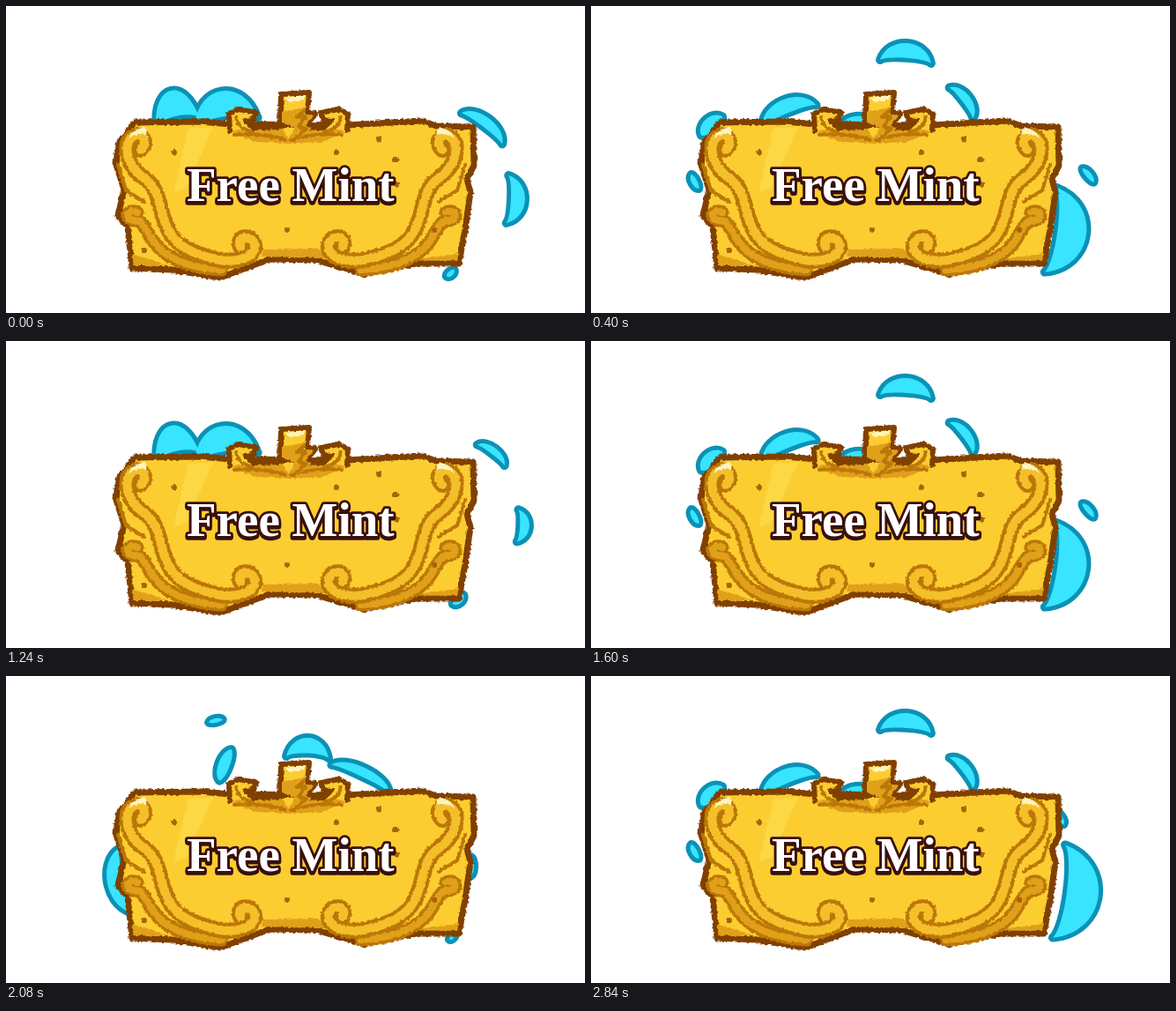
An HTML page for the animation above (2.88 s loop, 657 px wide and 348 px high).

```html
<!DOCTYPE html>
<html lang="en">
<head>
<meta charset="utf-8">
<title>Free Mint</title>
<style>
  html, body { margin: 0; width: 100%; height: 100%; overflow: hidden; background: #fff; }
  svg { display: block; width: 657px; height: 348px; }
  path, text { stroke-linejoin: round; stroke-linecap: round; }
  #rims { fill: none; stroke: #0b91b6; stroke-width: 10; }
  #rims path { vector-effect: non-scaling-stroke; }
  #fills { fill: #38e4ff; }
  .edge { fill: #fccd30; stroke: #804000; stroke-width: 7; }
  .thin { stroke-width: 6; }
  .shade { fill: #e0a01a; }
  .line { fill: none; stroke: #bb7707; stroke-width: 4; }
  .rim, .band { fill: none; stroke: #bb7707; stroke-width: 18; }
  .band { stroke: #f5bf2a; stroke-width: 10; }
  .low .rim { stroke-width: 15; }
  .low .band { stroke: #e0a01a; stroke-width: 8; }
  .glow { fill: #fdd845; }
  .shine { fill: #fff3bd; }
  .speck { stroke: #a6640a; stroke-width: 6; }
  text { font: bold 55px "Liberation Serif", serif; paint-order: stroke; stroke: #38100e; stroke-width: 5.5; }
</style>
</head>
<body>
<svg viewBox="0 0 657 348">
  <defs>
    <filter id="rough" x="0" y="0" width="657" height="348" filterUnits="userSpaceOnUse" color-interpolation-filters="sRGB">
      <feTurbulence type="fractalNoise" baseFrequency=".3" seed="4"/>
      <feDisplacementMap in="SourceGraphic" scale="4" xChannelSelector="R" yChannelSelector="G"/>
    </filter>
    <path id="hook" d="M149 234C139 229 133 240 144 243C160 241 158 264 180 280Q204 297 245 299"/>
    <path id="ribbon" d="M153 163C166 150 145 138 138 156C135 174 146 188 158 196C177 209 173 237 186 257C198 278 226 284 242 288C262 291 284 285 282 271C280 258 260 260 266 273"/>
    <g id="scroll">
      <path class="line" d="M127 180L136 209L157 222"/>
      <g class="low"><use href="#hook" class="rim"/><use href="#hook" class="band"/></g>
      <use href="#ribbon" class="rim"/><use href="#ribbon" class="band"/>
      <path class="shine" d="M139 150Q144 138 158 138L160 146Q149 143 139 150Z"/>
    </g>
    <g id="curl">
      <path class="shade" d="M252 141L312 136L324 156L282 154Z"/>
      <path class="line" d="M260 146Q290 143 318 152"/>
      <path class="edge thin" d="M254 141L253 122L264 117L284 121L281 129L272 130L281 138L311 137"/>
      <path class="line" d="M261 126Q263 139 280 143"/>
    </g>
  </defs>

  <g id="rims"></g>
  <g id="fills"></g>

  <g filter="url(#rough)">
    <path class="edge" d="M146 132L220 131L255 134L388 135L472 130L488 136L530 137L531 181L523 196L527 211L521 253
      L514 292L465 292L405 304L352 288L299 287L243 308L188 299L143 297L138 250L127 238L134 208L125 180L127 157Z"/>
    <path class="shade" d="M292 276L354 275L366 286L290 284ZM456 288L514 281L512 288ZM143 281L184 294L145 294Z"/>
    <path class="glow" d="M207 139L235 137L205 205L190 212Z"/>
    <use href="#scroll"/>
    <use href="#scroll" transform="matrix(-1 0 0 1 648 0)"/>
    <use href="#curl"/>
    <use href="#curl" transform="matrix(-1 0 0 1 641 0)"/>
    <path class="edge thin" d="M311 133L312 100L344 98L342 120L351 122L342 133"/>
    <path class="shade" d="M313 120L340 115L338 123L350 124L340 135L346 139L323 157L327 138L313 132Z"/>
    <path class="line" d="M338 119L330 126L340 125L332 137L341 139L325 153"/>
    <path class="shine" d="M316 104L340 101L338 106L321 109Z"/>
    <path class="speck" d="M191 166h1M156 277h1M319 254h0M375 166h0M441 174h2M423 151h0M486 254h0M443 202h0"/>
  </g>
  <text x="205" y="223" fill="#38100e" aria-hidden="true">Free Mint</text>
  <text x="205" y="221" fill="#fff">Free Mint</text>
</svg>

<script>
const LOOP = 2880, CYCLE = 1200, HOLD = 80;
const CENTRE = { x: 328, y: 215 };
const drops = [];

function addPath(layer, d) {
  const path = document.createElementNS("http://www.w3.org/2000/svg", "path");
  path.setAttribute("d", d);
  return document.getElementById(layer).appendChild(path);
}

// Long drops are crescents, short ones are beads.
function dropPath(half, height) {
  const top = -height / .75, base = -top * (half > 20 ? -.2 : .6), side = half * .75;
  return `M${-half} 0C${-side} ${top} ${side} ${top} ${half} 0C${side} ${base} ${-side} ${base} ${-half} 0Z`;
}

// A burst peaks at one moment; each drop bulges away from the sign.
function burst(peak, life, ...shapes) {
  for (const [x, y, half, height, tilt = 0] of shapes) {
    const dx = x - CENTRE.x, dy = y - CENTRE.y;
    const angle = Math.atan2(dx / 200 ** 2, -dy / 120 ** 2) * 180 / Math.PI + tilt;
    const d = dropPath(half, height);
    drops.push({ peak, life, x, y, angle, vx: dx * .0006, vy: -.12,
      paths: [addPath("rims", d), addPath("fills", d)] });
  }
}

// Left and top
burst(0, 200, [195, 132, 25, 37, 18], [250, 132, 36, 36, 10]);
burst(400, 200, [225, 125, 33, 20], [137, 136, 16, 10], [118, 199, 9, 4, -40],
  [357, 63, 29, 21], [420, 110, 22, 12, 35], [301, 130, 14, 5]);
burst(720, 160, [246, 82, 37, 18, 27], [153, 95, 14, 8], [91, 180, 8, 4, -25],
  [307, 75, 8, 4, -20], [272, 123, 22, 9], [378, 128, 30, 17]);
burst(880, 160, [249, 101, 19, 8, -55], [238, 51, 8, 3], [342, 92, 24, 22],
  [402, 116, 36, 13, 10], [138, 232, 38, 23]);

// Right, half a hold later
burst(-40, 150, [540, 139, 29, 14, -8], [569, 219, 27, 20]);
burst(40, 160, [513, 293, 8, 5]);
burst(360, 80, [564, 192, 10, 4, -25]);
burst(440, 300, [531, 244, 53, 45, -14], [531, 161, 9, 4]);
burst(840, 130, [527, 216, 11, 4], [506, 296, 4, 2]);

function draw(ms) {
  const phase = ms % LOOP % CYCLE;
  for (const { peak, life, x, y, angle, vx, vy, paths } of drops) {
    const offset = (peak + CYCLE) % HOLD;
    const held = Math.floor((phase - offset) / HOLD) * HOLD + offset;
    const age = (held - peak + CYCLE * 1.5) % CYCLE - CYCLE / 2;
    const size = Math.cos(Math.PI / 2 * age / life);
    const visible = Math.abs(age) < life;
    for (const path of paths) {
      path.style.display = visible ? "" : "none";
      path.setAttribute("transform",
        `translate(${x + vx * age} ${y + vy * age}) rotate(${angle}) scale(${size})`);
    }
  }
}

const start = performance.now();
function frame() {
  draw(Math.max(0, performance.now() - start));
  requestAnimationFrame(frame);
}
draw(0);
requestAnimationFrame(frame);
</script>
</body>
</html>
```
